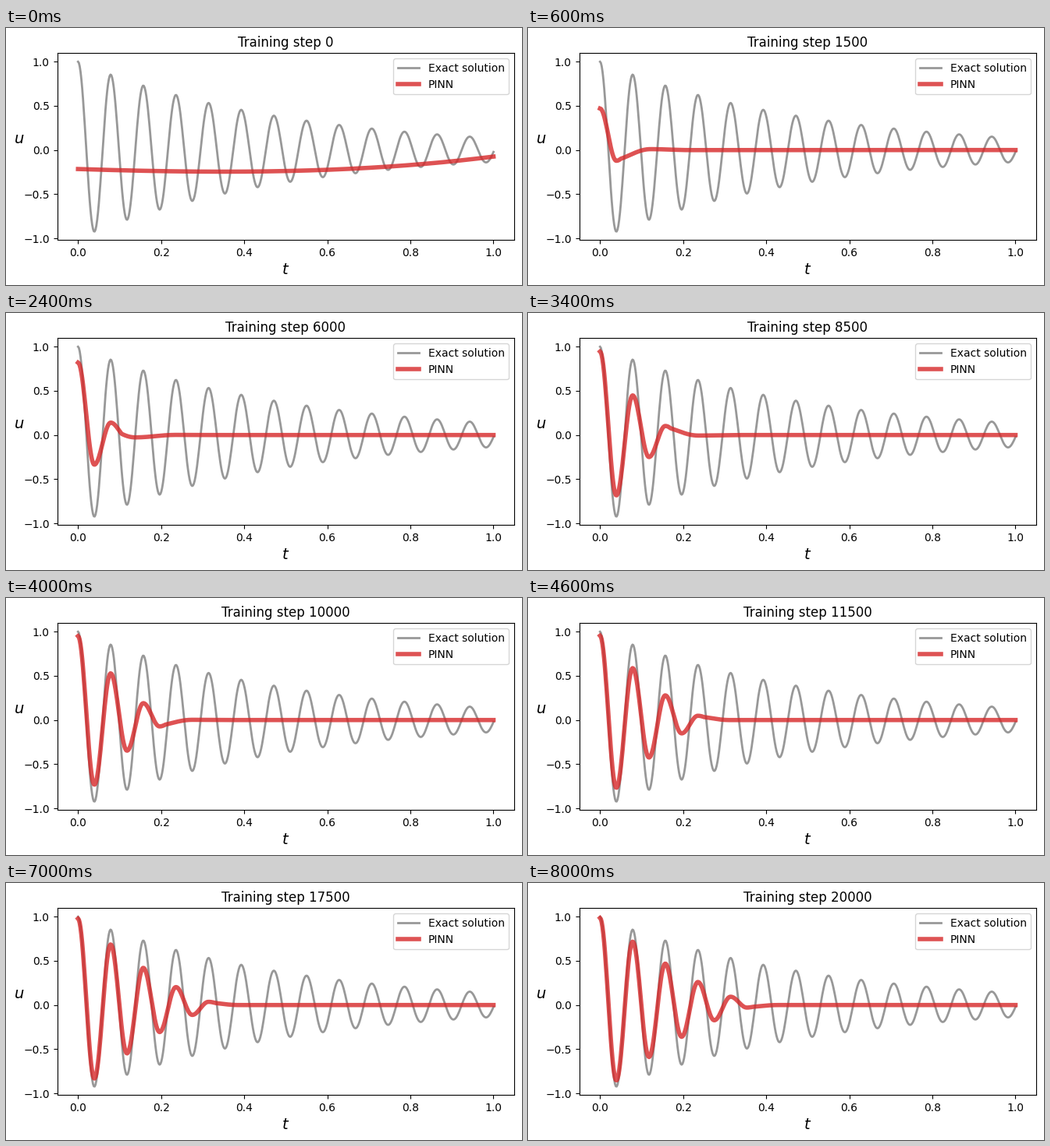
Animation, 661 px wide and 330 px high, one loop 8.2 s. Source, as a matplotlib script:

```python
import matplotlib.pyplot as plt
import numpy as np
from matplotlib.animation import FuncAnimation

W, H, DPI = 661, 330, 100
FRAMES, INTERVAL, STEP = 41, 200, 500
DECAY, OMEGA0 = 2, 80
SLOW = 0.4  # relative frequency beyond the part already learned

t = np.linspace(0, 1, 500)


def oscillator(t):
    """Under-damped harmonic oscillator with u(0) = 1 and u'(0) = 0."""
    w = np.sqrt(OMEGA0**2 - DECAY**2)
    phi = np.arctan(-DECAY / w)
    return np.exp(-DECAY * t) * np.cos(phi + w * t) / np.cos(phi)


def progress(i):
    """Start value, learned reach, fade exponent and fade softness."""
    at = [1, 8, 12, 17, 23, 30, 40]
    gain = [.35, .77, .82, .945, .955, .97, .985]
    reach = [.05, .05, .105, .17, .25, .293, .368]
    power = [.6, .6, .58, 1.04, 1.1, 1.155, 1.24]
    soft = [.3, .3, .15, .15, .06, .05, .04]
    return [np.interp(i, at, row) for row in (gain, reach, power, soft)]


def network(i):
    """Damped swings whose amplitude fades out at the learned reach."""
    if i == 0:
        x = t - .35
        return -.245 + .3 * x**2 + .16 * x**3
    gain, reach, power, soft = progress(i)

    def turning_value(k):
        tk = k * np.pi / OMEGA0
        tk = tk + (1 / SLOW - 1) * np.maximum(tk - reach, 0)
        z = 1 - (tk / reach)**power
        fade = np.logaddexp(0, z / soft) / np.logaddexp(0, 1 / soft)
        return (-1)**k * gain * np.exp(-DECAY * tk) * fade

    phase = OMEGA0 / np.pi * (t - (1 - SLOW) * np.maximum(t - reach, 0))
    k = phase.astype(int)
    blend = (1 - np.cos(np.pi * (phase - k))) / 2
    return (1 - blend) * turning_value(k) + blend * turning_value(k + 1)


fig = plt.figure(figsize=(W / DPI, H / DPI), dpi=DPI)
left, right, top, bottom = 65.65, 651.1, 32.4, 272.2
ax = fig.add_axes([left / W, 1 - bottom / H,
                   (right - left) / W, (bottom - top) / H])
ax.plot(t, oscillator(t), color="tab:grey", lw=2, alpha=.8,
        label="Exact solution")
ax.set_xlim(ax.get_xlim())
ax.set_ylim(ax.get_ylim())
pinn, = ax.plot(t, network(0), color="tab:red", lw=4, alpha=.8, label="PINN")
ax.set_xlabel("$t$", fontsize=14)
ax.set_ylabel("$u$", fontsize=14, rotation=0)
ax.legend(loc="upper right")
title = ax.set_title("Training step 0")


def update(i):
    pinn.set_ydata(network(i))
    title.set_text(f"Training step {i * STEP}")
    return pinn, title


anim = FuncAnimation(fig, update, frames=FRAMES, interval=INTERVAL,
                     repeat=True, repeat_delay=0)
plt.show()
```
